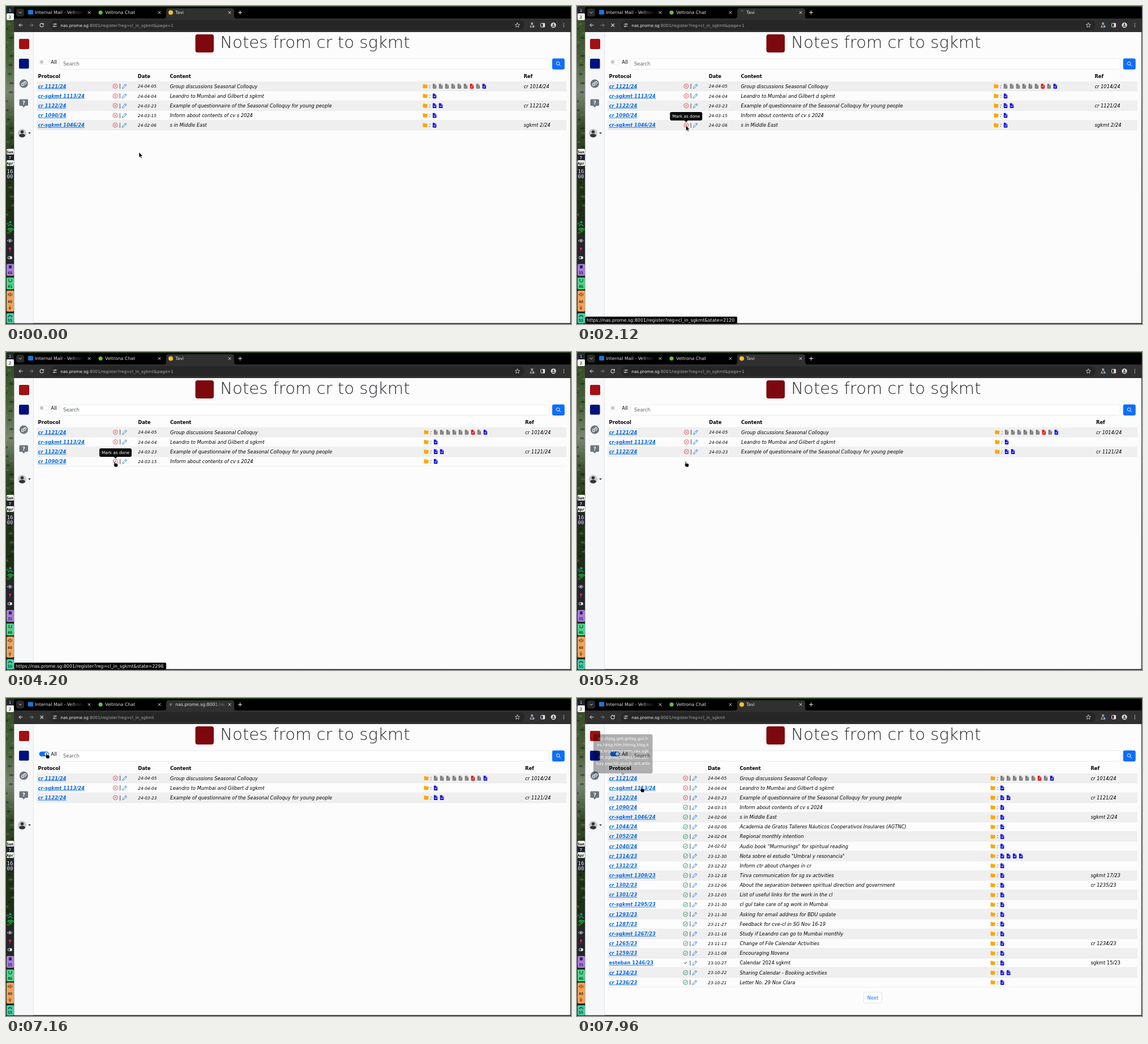
Write an HTML page that moves like this. It is 998 by 561 pixels and loops after 8 s.

```html
<!DOCTYPE html>
<html lang="en">
<head>
<meta charset="utf-8">
<title>Register</title>
<style>
html, body { margin: 0; width: 100%; height: 100%; overflow: hidden; background: #111a14; }
svg { display: block; width: 998px; height: 561px; }
text { font-family: "DejaVu Sans", sans-serif; font-size: 8.33px; white-space: pre; }
.mono { font-family: "DejaVu Sans Mono", monospace; }
</style>
</head>
<body>
<svg id="stage" viewBox="0 0 998 561" xmlns="http://www.w3.org/2000/svg"></svg>
<script>
const LOOP = 8000;
const BLUE = '#0d6efd', LINK = '#0b69de', UI = '#e3e3e3';

// Protocol | date | content | files (g grey, r red, b blue) | reference
const ROWS = `cr 1121/24|24-04-05|Group discussions Seasonal Colloquy|ggggggrgb|cr 1014/24
cr-sgkmt 1113/24|24-04-04|Leandro to Mumbai and Gilbert d sgkmt|b|
cr 1122/24|24-03-23|Example of questionnaire of the Seasonal Colloquy for young people|bb|cr 1121/24
cr 1090/24|24-03-15|Inform about contents of cv s 2024|b|
cr-sgkmt 1046/24|24-02-06|s in Middle East|b|sgkmt 2/24
cr 1044/24|24-02-06|Academia de Gratos Talleres Náuticos Cooperativos Insulares (AGTNC)|b|
cr 1052/24|24-02-04|Regional monthly intention|b|
cr 1040/24|24-02-02|Audio book "Murmurings" for spiritual reading|b|
cr 1314/23|23-12-30|Nota sobre el estudio "Umbral y resonancia"|bbbb|
cr 1312/23|23-12-22|Inform ctr about changes in cr|b|
cr-sgkmt 1309/23|23-12-18|Tirva communication for sg sv activities|b|sgkmt 17/23
cr 1302/23|23-12-06|About the separation between spiritual direction and government|b|cr 1235/23
cr 1301/23|23-12-05|List of useful links for the work in the cl|b|
cr-sgkmt 1295/23|23-11-30|cl gul take care of sg work in Mumbai|b|
cr 1293/23|23-11-30|Asking for email address for BDU update|b|
cr 1287/23|23-11-27|Feedback for cve-cl in SG Nov 16-19|b|
cr-sgkmt 1267/23|23-11-16|Study if Leandro can go to Mumbai monthly|b|
cr 1265/23|23-11-13|Change of File Calendar Activities|b|cr 1234/23
cr 1259/23|23-11-08|Encouraging Novena|b|
esteban 1246/23|23-10-27|Calendar 2024 sgkmt|b|sgkmt 15/23
cr 1234/23|23-10-22|Sharing Calendar - Booking activities|bb|
cr 1236/23|23-10-21|Letter No. 29 Nox Clara|b|`.split('\n').map(r => r.split('|'));

const esc = s => s.replace(/&/g, '&amp;').replace(/</g, '&lt;');
const text = (x, y, s, a = '') => `<text x="${x}" y="${y}" ${a}>${esc(s)}</text>`;
const rect = (x, y, w, h, fill, r = 0, a = '') =>
  `<rect x="${x}" y="${y}" width="${w}" height="${h}" rx="${r}" fill="${fill}" ${a}/>`;
const dot = (x, y, r, fill, a = '') => `<circle cx="${x}" cy="${y}" r="${r}" fill="${fill}" ${a}/>`;
const line = (d, color, w = 1, a = '') =>
  `<path d="${d}" fill="none" stroke="${color}" stroke-width="${w}" stroke-linecap="round" stroke-linejoin="round" ${a}/>`;
const at = (x, y, s) => `<g transform="translate(${x} ${y})">${s}</g>`;
const group = (id, s) => `<g id="${id}">${s}</g>`;
const cross = (x, y, r, color, w = 1) =>
  line(`M${x - r} ${y - r}l${2 * r} ${2 * r}m0 ${-2 * r}l${-2 * r} ${2 * r}`, color, w);
const size = (px, more = '') => `style="font-size:${px}px" ${more}`;

// Icons, centred on 0,0
const folder = '<path d="M-4-2.8q0-.8.8-.8h2l1 .9H3.4q.7 0 .7.7L3.6 2.8q-.1.8-.8.8h-6q-.8 0-.8-.8z" fill="#ffa500"/>';
const pencil = line('M-3.8 3.8l.8-2.6 5-5 1.8 1.8-5 5zM.9-2.7l1.8 1.8', '#1674dc', .8);
const openMark = dot(0, 0, 4, 'none', 'stroke="#dc3545" stroke-width=".8"') + cross(0, 0, 1.4, '#dc3545', .8);
const doneMark = dot(0, 0, 4, 'none', 'stroke="#198754" stroke-width=".8"') + line('M-1.9 0l1.4 1.5 2.5-3', '#198754', .9);
const tick = line('M-1.8 0l1.3 1.4 2.4-3', '#111', .9);
const FILE = { g: '#757575', r: '#e80000', b: '#0000d8' };
const file = k => `<path d="M-3.2-3.6q0-.6.6-.6h3l2.8 2.7v5.1q0 .7-.7.7h-5q-.7 0-.7-.7z" fill="${FILE[k]}"/>` +
  '<path d="M.5-4v2.4h2.4" fill="none" stroke="#fff" stroke-width=".6"/>' +
  (k === 'b' ? line('M-1.6-.2l.7 2.6.9-2 .9 2 .7-2.6', '#fff', .6)
    : k === 'r' ? line('M-1.6 2.2L0-.8l1.6 2.4-2.4-.4', '#fff', .6)
    : line('M-1.6.4h3.2m-3.2 1.7h3.2', '#bbb', .6));

function table(id, count, [mark, date, content, dir, ref]) {
  const bold = 'font-weight="700"', pitch = 17.15;
  let s = text(56.6, 127.4, 'Protocol', bold) + text(date, 127.4, 'Date', bold) +
    text(content, 127.4, 'Content', bold) + text(ref, 127.4, 'Ref', bold);
  const full = count > 5;
  ROWS.slice(0, count).forEach(([name, day, note, files, link], i) => {
    const top = 133 + i * pitch, y = top + 11.5, mid = top + 8.5;
    const plain = name.startsWith('esteban');
    const slant = plain ? '' : 'font-style="italic"';
    s += rect(54, top, 936, pitch, i % 2 ? 'none' : '#efefef') +
      rect(54, top + pitch - .5, 936, .5, '#d9dde1') +
      text(56.6, y, name, `${bold} ${slant} fill="${LINK}" text-decoration="underline"`) +
      at(mark, mid, plain ? tick : full && i > 2 ? doneMark : openMark) +
      text(mark + 6.9, y - .3, '|') + at(mark + 16.3, mid, pencil) +
      text(date, y - .1, day, size(7.28, slant)) + text(content, y, note, slant) +
      at(dir, mid, folder) + text(dir + 6.8, y, ':', slant) + text(ref, y, link, slant);
    [...files].forEach((k, n) => s += at(dir + 16.6 + n * 10.97, mid, file(k)));
  });
  if (full) s += rect(506.5, 519, 32, 19, '#fff', 3, 'stroke="#dee2e6"') +
    text(522.5, 531.5, 'Next', `text-anchor="middle" fill="${BLUE}"`);
  return group(id, s);
}

function desktop() {
  const mid = (y, s, a = '', px = 6.6) => text(7, y, s, `class="mono" text-anchor="middle" style="font-size:${px}px" ${a}`);
  const white = 'fill="#eee"', bold = 'font-weight="700"';
  let s = `<defs><linearGradient id="wood" x2="0" y2="1">
    <stop offset="0" stop-color="#31491f"/><stop offset=".17" stop-color="#4a5f3a"/>
    <stop offset=".27" stop-color="#7b8775"/><stop offset=".38" stop-color="#354a28"/>
    <stop offset=".55" stop-color="#223318"/><stop offset=".75" stop-color="#1b2c16"/>
    <stop offset="1" stop-color="#14241a"/></linearGradient>
    <linearGradient id="fade"><stop offset="0" stop-color="#000" stop-opacity="0"/><stop offset="1"/></linearGradient></defs>` +
    rect(0, 0, 998, 561, 'url(#wood)');
  for (let i = 0; i < 70; i++) {
    const a = Math.abs(Math.sin(i * 91.7) * 437.5) % 1;
    s += `<ellipse cx="${(a * 14).toFixed(1)}" cy="${i * 8}" rx="${(2 + a * 3).toFixed(1)}" ry="2" fill="${i % 2 ? '#0c180b' : '#66814a'}" opacity=".4"/>`;
  }
  s += rect(1, 1, 13, 12, '#222630', 2) + mid(9.5, '1', white) + rect(1, 13, 13, 12, '#f2f2f2', 2) + mid(21.7, '2') +
    rect(1, 252, 13, 10, '#f2f2f2', 2) + mid(259.6, 'Sun', bold) + rect(1, 262, 13, 10, '#20232b', 2) +
    mid(269.8, '7', white + bold) + rect(1, 272, 13, 10, '#f2f2f2', 2) + mid(279.6, 'Apr', bold) +
    rect(1, 284, 13, 23, '#20232b', 2) + mid(294.5, '16', white, 9) + mid(304, '00', white, 9) +
    dot(7.5, 381.5, 2, '#16a08a') + line('M4 388q3.5-5 7 0', '#16a08a', 1.5) +
    line('M3 394q5-4 10 0m-8 2q3-2.5 6 0m-4 2h2', '#1fd34f', 1.3) +
    rect(0, 404, 14, 48, '#23252d', 3) + line('M3 414q4-5 8 0q-4 5-8 0z', '#eee', .8) + dot(7, 414, 1.3, '#eee') +
    dot(7, 428, 2, '#e3263c') + line('M7 430v3', '#e3263c') + rect(3, 441.5, 8, 5, '#eee', 2.5) + dot(5.5, 444, 1.7, '#23252d') +
    rect(1, 455, 13, 21, '#a67bdc', 2) + rect(5, 457.5, 5, 5.5, '#36264c', 1) +
    rect(1, 479, 13, 21, '#4fd08c', 2) + line('M5 482v4q2.5 2 5 0v-4', '#123a25', 1) +
    rect(1, 502, 13, 37, '#f0a35c', 2) + line('M4 508h1.5l2.5-2v6l-2.5-2H4zm6.5-.5v3', '#4d2c10', .9) + mid(523.5, '40') +
    line('M7 529v3.5m-2.5-.5q2.5 3.5 5 0m-2.5 2v2', '#4d2c10', 1) +
    rect(1, 542, 13, 18, '#49c9a0', 2) + line('M4 548q3-4 6.5 0', '#123a33', 1.3) + mid(557, '55');
  return s + group('loadOld', mid(473, '48') + mid(497, '41')) + group('loadNew', mid(473, '35') + mid(497, '46'));
}

function browser() {
  const tab = size(7.8, `fill="${UI}"`), addr = size(7.28, 'fill="#a6a6a6"');
  const host = '<tspan fill="#eee">nas.prome.sg</tspan>:8001/register?reg=cl_in_sgkmt';
  const url = more => `<text x="96.3" y="36.6" ${addr}>${host}${more}</text>`;
  return rect(14, 1.5, 983.5, 558.5, '#000', 2) +
    rect(18, 4.5, 14, 14, '#2a2a2a', 4) + line('M23 10.5l2.2 2.2 2.2-2.2', UI) +
    rect(39, 7, 9, 8, '#1579d8', 1) + text(51.5, 14, 'Internal Mail - Veltrona', tab) +
    rect(112, 4, 26, 15, 'url(#fade)') + rect(138, 4, 18, 15, '#000') + cross(147, 11.5, 2, UI) +
    dot(167, 11.5, 3.6, '#68c23a') + text(175, 14, 'Veltrona Chat', tab) + cross(271, 11.5, 2, UI) +
    '<path d="M279 22q4 0 4-4V8q0-4 4-4h112q4 0 4 4v10q0 4 4 4z" fill="#303030"/>' +
    group('name', text(299, 14, 'Tavi', tab)) +
    group('pending', `<svg x="299" y="2" width="87" height="20">${text(0, 12, 'nas.prome.sg:8001/register', tab)}</svg>` +
      rect(372, 5, 14, 15, '#303030', 0, 'opacity=".6"') + dot(291, 11.5, 2.6, '#5c5c5c') + line('M289.5 13l3-3', '#999', .7)) +
    group('icon', dot(291, 11.5, 4, '#f2c230')) +
    group('spin', line('M0-3.4a3.4 3.4 0 0 0-3.2 2.4', '#888')) +
    cross(395, 11.5, 2, UI) + line('M410.5 11.5h6m-3-3v6', UI, 1.1) +
    rect(14, 22, 983.5, 24, '#303030') + rect(78, 25, 838, 17.5, '#262626', 8.7) +
    line('M29 33.8h-6m2.8-2.8l-2.8 2.8 2.8 2.8', UI) + line('M42 33.8h6m-2.8-2.8l2.8 2.8-2.8 2.8', '#858585') +
    group('reload', line('M65.8 32a3.2 3.2 0 1 0 .5 2.6', UI, 1.1) + `<path d="M66.8 30v3h-3z" fill="${UI}"/>`) +
    group('stop', cross(63.3, 33.8, 2.5, UI, 1.1)) +
    line('M83 32h3m3.5 0h-1m-5.5 3.8h1m2 0h3.2', UI, .9) + dot(87, 32, 1.1, 'none', `stroke="${UI}" stroke-width=".8"`) +
    dot(85, 35.8, 1.1, 'none', `stroke="${UI}" stroke-width=".8"`) +
    group('urlPage', url('&amp;page=1')) + group('urlBare', url('')) +
    line('M903.3 29.8l1.2 2.6 2.8.3-2.1 1.9.6 2.8-2.5-1.5-2.5 1.5.6-2.8-2.1-1.9 2.8-.3z', UI, .8) +
    line('M927.5 30h3m-2.2 0v2.8l-2.6 4.4h7l-2.6-4.4V30', UI, .9) + dot(932, 36, 1.5, '#8ab4f8') +
    rect(944.5, 30.5, 7, 6.6, 'none', 1, `stroke="${UI}"`) + rect(948.4, 30.5, 3.4, 6.6, UI) +
    dot(967, 33.8, 4.6, UI) + dot(967, 32.3, 1.4, '#303030') + rect(964.4, 34.6, 5.2, 2, '#303030', 1) +
    [31, 33.8, 36.6].map(y => dot(985.3, y, .8, UI)).join('');
}

function page() {
  const gray = '#6c757d';
  return rect(14.5, 46, 982.5, 513.5, '#fcfcfc') + rect(14.5, 46, 33.5, 513.5, '#f6f7f8') + rect(48, 46, .8, 513.5, '#dcdfe2') +
    rect(23, 58, 18, 18, '#a30f14', 2) + rect(23, 93, 17.5, 17.5, '#00107f', 2) +
    dot(31.3, 137, 7.6, gray) + line('M31 135.2l1.4-1.4a2 2 0 0 1 2.8 2.8l-2 2m-1.4.2l-1.4 1.4a2 2 0 0 1-2.8-2.8l2-2m.3 2.7l2.8-2.8', '#fff', 1.1) +
    `<path d="M25 164.5h12.5q1.5 0 1.5 1.5v8.5q0 1.5-1.5 1.5H34l-2.7 3-2.7-3H25q-1.5 0-1.5-1.5V166q0-1.5 1.5-1.5z" fill="${gray}"/>` +
    text(31.3, 173.6, '?', 'text-anchor="middle" font-weight="700" fill="#fff"') +
    dot(28.5, 224.3, 7.6, '#c9c9c9') + dot(28.5, 222, 2.8, '#333') + '<path d="M23 229.5q0-4 5.5-4t5.5 4q-5.500 4.500-11 0z" fill="#333"/>' +
    '<path d="M39 223h5l-2.5 2.8z" fill="#333"/>' +
    rect(334.500, 50, 32.500, 32, '#7d080d', 4) + text(378.300, 74, 'Notes from cr to sgkmt', size(29.12, 'font-weight="200" fill="#212529"')) +
    group('off', rect(59, 94.700, 16, 8, '#fff', 4, 'stroke="#dee2e6" stroke-width=".7"') + dot(63.200, 98.700, 3, '#c4c4c4')) +
    group('on', rect(58.600, 94.500, 17, 8.400, BLUE, 4.200) + dot(71.300, 98.700, 3, '#fff')) +
    text(79.300, 101.600, 'All') +
    rect(94.500, 92.800, 865, 18.600, '#fff', 3, 'stroke="#dee2e6" stroke-width=".7"') + text(101, 105.200, 'Search', 'fill="#5c6268"') +
    rect(964.700, 92.500, 22, 19.500, BLUE, 3) + dot(975, 101.300, 2.900, 'none', 'stroke="#fff" stroke-width=".9"') + line('M977.200 103.500l2.400 2.400', '#fff', 1);
}

function overlays() {
  const white = 'fill="#fff" text-anchor="middle"';
  const status = (id, n) => group(id, rect(14.5, 548, 268.5, 12, '#050505', 2) +
    text(17, 557, 'https://nas.prome.sg:8001/register?reg=cl_in_sgkmt&state=' + n, size(7.93, 'fill="#eee"')));
  const codes = ['ey,chjsg,gnt,gntsg,gul,h', 'es,hksg,hlm,hlmsg,klsg,k', 'mt,kry,krysg,prm,rav,sgk', 'mt,sgmsg,shgsg,sss,sss', 'bay,ssschk,sssckr,wtl,wtls'];
  return group('tip', rect(-28.5, -17.5, 57, 15, '#000', 3) + '<path d="M-3.200-2.800h6.400L0 .6z"/>' + text(0, -7.300, 'Mark as done', size(7.28, white))) +
    group('codes', rect(29, 64, 104.500, 69, '#000', 3) + '<path d="M78 133h6.400l-3.200 3.500z"/>' +
      codes.map((c, i) => text(81.200, 74 + i * 10.900, c, size(7.28, white))).join('')) +
    status('status1', 2120) + status('status2', 2298) +
    group('cursor',
      group('arrow', '<path d="M0 0v9.200l2.100-1.900 1.400 3.100 1.500-.7-1.400-3h2.900z" fill="#000" stroke="#fff" stroke-width=".5"/>') +
      group('hand', '<path d="M-.7.300q.9-.8 1.500.2v3q2.700-.3 4.400 1.100.8 2.600-.6 5.200H.4Q-1.500 7.500-2 5.300q.3-.9 1.300.2z" fill="#000" stroke="#fff" stroke-width=".4"/>'));
}

document.getElementById('stage').innerHTML = desktop() + browser() + page() +
  table('five', 5, [192.9, 232.8, 289.4, 740.4, 914.4]) +
  table('four', 4, [193.4, 233.3, 290, 742.4, 917]) +
  table('three', 3, [193.4, 233.3, 290, 742.4, 917]) +
  table('all', 22, [191.7, 231.3, 287.4, 734.6, 907.4]) + overlays();

const el = {};
document.querySelectorAll('g[id]').forEach(g => el[g.id] = g);

// Cursor stops: time, x, y
const PATH = [[0, 235, 258], [200, 235, 258], [1240, 192.5, 211], [2560, 192.5, 211], [3000, 196, 231],
  [3400, 196, 231], [3960, 192, 193], [5920, 192, 193], [6600, 71.5, 97], [7640, 71.5, 97], [7960, 113.5, 156.5]];
// Half-open spans in which each part shows
const SHOW = {
  loadOld: [[0, 900]], loadNew: [[900, LOOP]],
  five: [[0, 2440]], four: [[2440, 4960]], three: [[4960, 7480]], all: [[7480, LOOP]],
  stop: [[1760, 2440], [4280, 4960], [6840, 7480]], spin: [[1760, 2440], [4280, 4960], [6840, 7080]],
  pending: [[7080, 7480]], urlBare: [[7080, LOOP]], on: [[6800, LOOP]],
  status1: [[1320, 2440]], status2: [[4080, 4960]],
  hand: [[1240, 1760], [3920, 4280], [4960, 5960], [6560, 7680], [7880, LOOP]]
};
const FADES = { tip: [[1240, 2440], [3960, 4960]] };

const within = (spans, t) => spans.find(([a, b]) => t >= a && t < b);
const show = (id, on) => el[id].style.display = on ? '' : 'none';

function cursorAt(t) {
  const i = PATH.findIndex(p => p[0] > t);
  if (i < 0) return PATH[PATH.length - 1].slice(1);
  const [t0, x0, y0] = PATH[i - 1], [t1, x1, y1] = PATH[i];
  const k = (t - t0) / (t1 - t0), e = k * k * (3 - 2 * k);
  return [x0 + (x1 - x0) * e, y0 + (y1 - y0) * e];
}

function render(t) {
  const on = {};
  for (const id in SHOW) show(id, on[id] = !!within(SHOW[id], t));
  show('reload', !on.stop);
  show('name', !on.pending);
  show('icon', !on.pending && !on.spin);
  show('urlPage', !on.urlBare);
  show('off', !on.on);
  show('arrow', !on.hand);
  const tip = within(FADES.tip, t);
  el.tip.style.opacity = tip ? Math.min(.95, (t - tip[0]) / 150) : 0;
  el.tip.setAttribute('transform', `translate(${t < 3000 ? '192.700 204.500' : '193.400 187.400'})`);
  el.codes.style.opacity = Math.max(0, Math.min(.9, (t - 7900) / 200));
  el.spin.setAttribute('transform', `translate(291 11.500) rotate(${t * .36 % 360})`);
  el.cursor.setAttribute('transform', `translate(${cursorAt(t).join(' ')})`);
}

const start = performance.now();
function tickFrame() {
  render((performance.now() - start) % LOOP);
  requestAnimationFrame(tickFrame);
}
render(0);
requestAnimationFrame(tickFrame);
</script>
</body>
</html>
```
